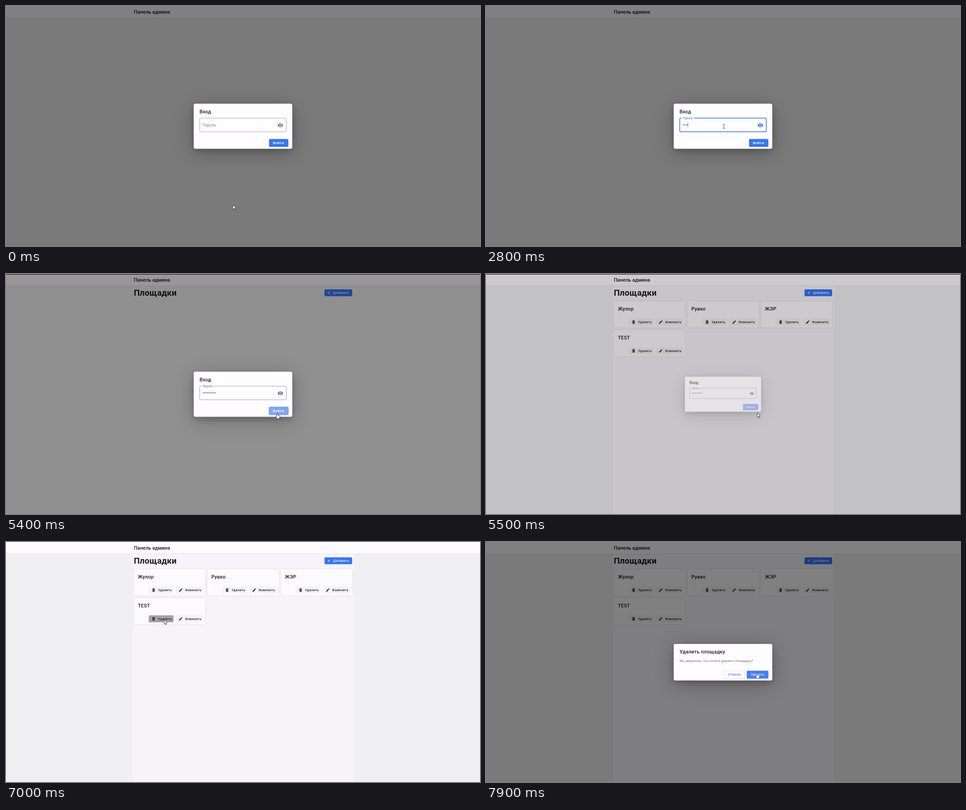
Write an HTML page that moves like this. It is 1053 by 532 pixels and loops after 8 s.

```html
<!DOCTYPE html>
<html lang="ru">
<head>
<meta charset="utf-8">
<title>Панель админа</title>
<style>
html, body { margin: 0; width: 100%; height: 100%; overflow: hidden; background: #f0eff1; }
svg { display: block; width: 100%; height: 100%; }
text { font-family: Roboto, sans-serif; fill: #1d1c1e; white-space: pre; }
.title { font-size: 10.97px; font-weight: 500; }
.heading { font-size: 18.65px; font-weight: 700; letter-spacing: .14px; }
.caption { font-size: 10.97px; font-weight: 500; letter-spacing: .18px; }
.button { font-size: 6.7px; font-weight: 500; letter-spacing: .6px; }
.login { font-size: 7.7px; font-weight: 700; letter-spacing: .65px; }
.body { font-size: 7.68px; letter-spacing: .05px; fill: #716f72; }
.label { font-size: 8.77px; }
.white { fill: #fff; }
.blue { fill: #3575f5; }
.card { fill: #fcfafd; filter: drop-shadow(0 .8px 1px rgba(0,0,0,.16)); }
.sheet { fill: #fffdff; filter: drop-shadow(0 5px 7px rgba(0,0,0,.2)) drop-shadow(0 8px 22px rgba(0,0,0,.24)); }
.cursor { fill: #fff; stroke: #242326; stroke-width: .8; stroke-linejoin: round; }
</style>
</head>
<body>
<svg id="stage" viewBox="0 0 1053 532" preserveAspectRatio="none"></svg>
<script>
const LOOP = 8000, STEP = 100, DIM = 0.49;
const CENTER = [526.5, 266.5];
const BLUE = '#3575fa';

const clamp = v => Math.min(1, Math.max(0, v));
const ramp = (t, from, to) => clamp((t - from) / (to - from));
const mix = (a, b, p) => a + (b - a) * p;
const smooth = p => p * p * (3 - 2 * p);
const easeOut = p => 1 - (1 - p) ** 3;

const text = (x, y, cls, str, id = '') => `<text id="${id}" x="${x}" y="${y}" class="${cls}">${str}</text>`;
const rect = (x, y, w, h, r, attrs) => `<rect x="${x}" y="${y}" width="${w}" height="${h}" rx="${r}" ${attrs}/>`;
const icon = (cx, cy, size, d, attrs = 'fill="#1d1c1e"') =>
  `<path transform="translate(${cx} ${cy}) scale(${size / 24}) translate(-12 -12)" d="${d}" ${attrs}/>`;

const TRASH = 'M6 19c0 1.1.9 2 2 2h8c1.1 0 2-.9 2-2V7H6zM19 4h-3.5l-1-1h-5l-1 1H5v2h14zM9 10h1.5v8H9zM13.5 10H15v8h-1.5z';
const PENCIL = 'M3 17.2V21h3.8L17.8 9.9 14.1 6.2zM20.7 7c.4-.4.4-1 0-1.4l-2.3-2.3c-.4-.4-1-.4-1.4 0l-1.9 1.8 3.8 3.8z';
const PLUS = 'M19 13h-6v6h-2v-6H5v-2h6V5h2v6h6z';
const EYE = 'M12 4.5C7 4.5 2.7 7.6 1 12c1.7 4.4 6 7.5 11 7.5s9.3-3.1 11-7.5c-1.7-4.4-6-7.5-11-7.5z'
  + 'M12 17a5 5 0 1 1 0-10 5 5 0 0 1 0 10zM12 9a3 3 0 1 0 0 6 3 3 0 0 0 0-6z';

function card(name, col, row) {
  const last = name === 'TEST' ? 'id="pressed"' : '';
  return `<g transform="translate(${284.2 + col * 163.3} ${60.2 + row * 63.8})">
    ${rect(0, 0, 158.4, 58.6, 3.5, 'class="card"')}
    ${text(8.8, 20.6, 'caption', name)}
    ${rect(32.8, 38.6, 55.2, 15.4, 2.2, `${last} fill="#f3f2f4"`)}
    ${icon(43.7, 46.3, 9.9, TRASH, 'fill="#1d1c1e" fill-rule="evenodd"')}${text(53.7, 48.7, 'button', 'Удалить')}
    ${rect(92.8, 38.6, 61.4, 15.4, 2.2, 'fill="#f3f2f4"')}
    ${icon(104, 46.3, 9.9, PENCIL)}${text(114, 48.7, 'button', 'Изменить')}
  </g>`;
}

document.getElementById('stage').innerHTML = `
  ${rect(0, 0, 1053, 532, 0, 'fill="#f0eff1"')}
  ${rect(282, 26, 491, 506, 0, 'id="column" fill="#f6f4f8"')}
  ${rect(0, 0, 1053, 26, 0, 'fill="#fcfafd"')}
  ${rect(0, 25.7, 1053, .8, 0, 'fill="#dddbde"')}
  ${text(284, 17, 'title', 'Панель админа')}
  <g id="page">
    ${text(284, 48.2, 'heading', 'Площадки')}
    ${rect(707.5, 34, 61.5, 15.3, 2.2, `fill="${BLUE}"`)}
    ${icon(717.2, 41.6, 9.9, PLUS, 'fill="#fff"')}${text(727, 44, 'button white', 'Добавить')}
  </g>
  <g id="cards">
    ${card('Жулор', 0, 0)}${card('Рувко', 1, 0)}${card('ЖЭР', 2, 0)}${card('TEST', 0, 1)}
  </g>
  ${rect(0, 0, 1053, 532, 0, 'id="shade" fill="#000"')}
  <g id="loginDialog">
    ${rect(417, 216.5, 219, 100, 4, 'class="sheet"')}
    ${text(430, 238, 'caption', 'Вход')}
    ${rect(430.4, 248.6, 192.2, 30.2, 2.2, 'id="field" fill="none"')}
    ${rect(434.3, 247, 27.7, 3, 0, 'id="notch" fill="#fffdff"')}
    ${text(0, 0, 'label', 'Пароль', 'label')}
    <path id="dots" fill="none" stroke="#2b2a2c" stroke-width="1.9" stroke-linecap="round" stroke-dasharray="0 2.94"/>
    ${rect(0, 258.5, .7, 10.5, 0, 'id="caret" fill="#555"')}
    ${icon(609.6, 264.4, 13.2, EYE, 'id="eye" fill-rule="evenodd"')}
    ${rect(584.3, 294.8, 43, 17.4, 2.2, 'id="loginButton"')}
    ${text(593, 305.6, 'login white', 'Войти')}
  </g>
  <g id="deleteDialog">
    ${rect(417, 226, 219, 81, 4, 'class="sheet"')}
    ${text(430, 247.4, 'caption', 'Удалить площадку')}
    ${text(430, 266.2, 'body', 'Вы уверенны, что хотите удалить площадку?')}
    ${rect(529, 285.6, 45.8, 17, 2.2, 'fill="none" stroke="#dedce0" stroke-width=".8"')}
    ${text(538, 296.4, 'button blue', 'Отмена')}
    ${rect(579.2, 285.2, 48.2, 17.6, 2.2, 'id="deleteButton"')}
    ${text(588.4, 296.4, 'button white', 'Удалить')}
  </g>
  ${rect(0, 0, 1053, 1, 0, 'id="topLine" fill="#000"')}
  <g id="cursor">
    <path id="arrow" class="cursor" d="M0 0V9.8L2.3 7.8 3.7 11.2 5.2 10.6 3.8 7.3H6.8Z"/>
    <path id="hand" class="cursor" d="M-1 1a1 1 0 0 1 2 0V4.6l3.6.8q1.2.3 1.2 1.5V9L4.6 12.4H-.2L-3.2 8q-.4-1.6 1-1.3L-1 7.6Z"/>
    <path id="beam" d="M-2.2-4.6H-.6L0-4 .6-4.6H2.2M0-4V4M-2.2 4.6H-.6L0 4 .6 4.6H2.2" fill="none" stroke="#333" stroke-width=".9"/>
  </g>`;

const el = {};
document.querySelectorAll('[id]').forEach(node => { if (node.id) el[node.id] = node; });
const set = (name, attrs) => { for (const key in attrs) el[name].setAttribute(key, attrs[key]); };
const show = (name, on) => { el[name].style.display = on ? '' : 'none'; };

const KEYSTROKES = [2000, 2300, 2600, 2800, 3200, 3700, 3800, 4000, 4100, 4400];
const CURSOR_PATH = [
  [0, 504, 441], [600, 504, 441], [1400, 528.5, 267], [4700, 528.5, 267], [5200, 602.5, 308.5],
  [5600, 602.5, 308], [6500, 348, 187], [6700, 351.3, 172.3], [7100, 351.3, 172.3], [7800, 602, 290], [LOOP, 602, 290]
];
// Areas that change the pointer: shape, active time, box
const HOT_AREAS = [
  ['beam', 0, 5500, 430, 248, 600, 279],
  ['hand', 0, 5500, 584, 295, 628, 312],
  ['hand', 5600, 7000, 317, 163, 372, 178],
  ['hand', 7200, LOOP, 579, 285, 628, 303]
];

function drawCursor(t) {
  const next = CURSOR_PATH.findIndex(k => k[0] > t);
  const [t0, x0, y0] = CURSOR_PATH[next - 1], [t1, x1, y1] = CURSOR_PATH[next];
  const p = smooth(ramp(t, t0, t1));
  const x = mix(x0, x1, p), y = mix(y0, y1, p);
  const hot = HOT_AREAS.find(([, from, to, l, top, r, b]) =>
    t >= from && t < to && x >= l && x <= r && y >= top && y <= b);
  const shape = hot ? hot[0] : 'arrow';
  for (const name of ['arrow', 'hand', 'beam']) show(name, name === shape);
  set('cursor', { transform: `translate(${x} ${y})` });
}

function drawField(t) {
  const focused = t >= 1500 && t < 5300;
  const blurred = t >= 5300;
  const float = smooth(ramp(t, 1400, 1550));
  const typed = KEYSTROKES.filter(k => k <= t).length;
  set('field', {
    stroke: focused ? '#3070ee' : blurred ? '#8197b5' : '#9d9b9e',
    'stroke-width': focused ? mix(.95, 1.5, ramp(t, 1600, 2000)) : .9
  });
  show('notch', float > 0);
  set('label', { transform: `translate(436.4 ${mix(266.6, 251.3, float)}) scale(${mix(1, .75, float)})` });
  el.label.style.fill = focused ? '#3c78e8' : blurred ? '#627692' : '#838184';
  set('eye', { fill: focused ? '#2f6ee8' : blurred ? '#566a88' : '#747275' });
  show('dots', typed > 0);
  set('dots', { d: `M438.3 263.4h${2.94 * (typed - 1) + .1}` });
  show('caret', focused);
  set('caret', { x: 436.6 + 2.94 * typed });
  set('loginButton', {
    fill: blurred ? '#80a5fa' : BLUE,
    stroke: blurred ? '#5f8df0' : 'none', 'stroke-width': .8
  });
}

function drawDialog(name, p) {
  const [cx, cy] = CENTER;
  show(name, p > 0);
  set(name, { opacity: p, transform: `translate(${cx} ${cy}) scale(${.5 + p / 2}) translate(${-cx} ${-cy})` });
}

function render(t) {
  const opening = easeOut(ramp(t, 7040, 7240));
  show('column', t >= 5500);
  show('page', t >= 5400);
  show('cards', t >= 5500);
  show('topLine', t >= 5300 && t < 6000);
  set('shade', { opacity: DIM * (1 - ramp(t, 5355, 5595) + opening) });
  set('pressed', { fill: t >= 7000 && t < 7200 ? '#a3a1a4' : '#f3f2f4' });
  set('deleteButton', { fill: t >= 7900 ? '#4380fb' : BLUE });
  drawField(t);
  drawDialog('loginDialog', 1 - ramp(t, 5400, 5620));
  drawDialog('deleteDialog', opening);
  drawCursor(t);
}

const start = performance.now();
function tick() {
  const t = (performance.now() - start) % LOOP;
  render(Math.floor(t / STEP) * STEP);
  requestAnimationFrame(tick);
}
tick();
</script>
</body>
</html>
```
